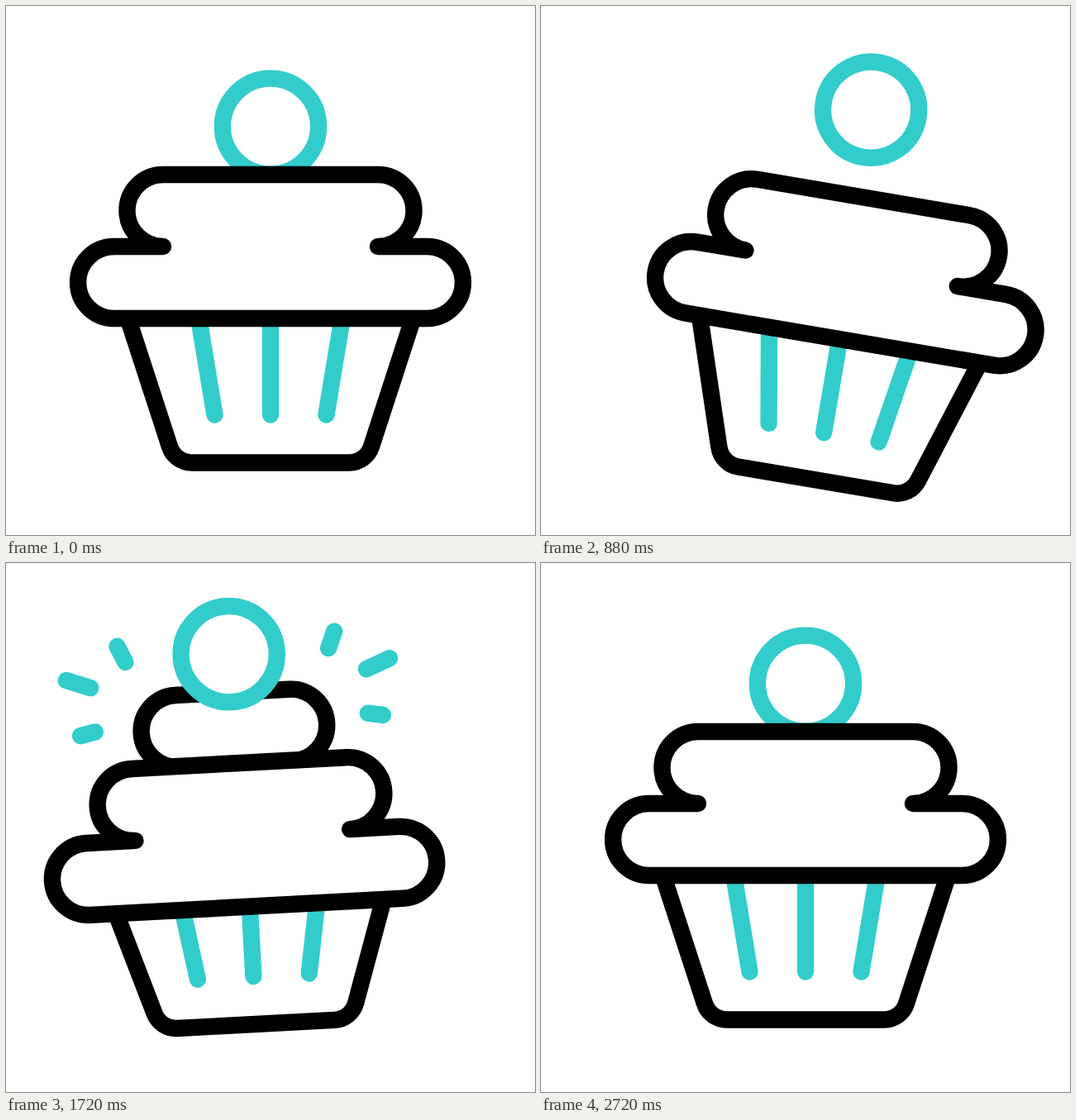
Write an HTML page that moves like this. It is 640 px wide and 640 px high and loops after 2800 ms.

```html
<!DOCTYPE html>
<html lang="en">
<head>
<meta charset="utf-8">
<title>Cupcake</title>
<style>
  html, body { margin: 0; width: 100%; height: 100%; overflow: hidden; background: #fff; }
  svg { display: block; width: 100vw; height: 100vh; }
  .ink, .teal { stroke-width: 20.4; stroke-linecap: round; stroke-linejoin: round; fill: #fff; }
  .ink { stroke: #000; }
  .teal { stroke: #3cc; }
</style>
</head>
<body>
<svg viewBox="0 0 640 640">
  <g id="cake">
    <g id="rays" class="teal" transform="translate(309 140) rotate(-.9)"></g>
    <path class="ink" d="M143.7 366L198 533A28 28 0 0 0 224.6 552.5H415.4A28 28 0 0 0 442 533L496.3 366"/>
    <path class="teal" d="M231.6 368L252.5 494.5M320 368V494.5M408.4 368L387.5 494.5"/>
    <rect id="tier" class="ink" x="207.6" y="214" width="224.8" height="87" rx="43.5"/>
    <circle id="cherry" class="teal" cx="320" cy="145.7" r="58.1"/>
    <path id="frosting" class="ink" d="M190 291H130.6A43.5 43.5 0 0 0 130.6 378H509.4A43.5 43.5 0 0 0 509.4 291H450A43.5 43.5 0 0 0 450 204H190A43.5 43.5 0 0 0 190 291Z"/>
  </g>
</svg>
<script>
const LOOP = 2800, STEP = 40;
const $ = id => document.getElementById(id);

const smooth = p => p * p * (3 - 2 * p);
const smoother = p => p * p * p * (p * (6 * p - 15) + 10);

// Eased progress from 0 to 1 between two times
const tween = (t, from, to, ease = smooth) =>
  ease(Math.min(1, Math.max(0, (t - from) / (to - from))));

function move(id, x, y, turn = 0) {
  $(id).setAttribute("transform", `translate(${x} ${y}) rotate(${turn} 320 320)`);
}

function add(parent, tag, transform) {
  const el = document.createElementNS("http://www.w3.org/2000/svg", tag);
  el.setAttribute("transform", transform);
  return parent.appendChild(el);
}

// The same three rays on both sides of the cherry
function makeRay(side, x, y, angle, length) {
  return { line: add(side, "line", `translate(${x} ${y}) rotate(${angle})`), length };
}

const rays = [1, -1].flatMap(flip => {
  const side = add($("rays"), "g", `scale(${flip} 1)`);
  return [
    makeRay(side, 125, -39.5, -66.7, 24),
    makeRay(side, 171.5, -8.5, -21, 34.7),
    makeRay(side, 170, 47.5, 11, 20.5)
  ];
});

// Tip to the right, sway over to the left, settle upright
function lean(t) {
  const sway = tween(t, 770, 1300, smoother);
  const settle = tween(t, 1300, 2120);
  const x = 59 * tween(t, 20, 620) - 121 * sway + 62 * settle;
  const y = 24.5 * tween(t, 80, 640) - 5.5 * sway - 19 * tween(t, 1320, 1950);
  const turn = 10.7 * tween(t, 40, 640) - 17 * sway + 6.3 * settle;
  move("cake", x, y, turn);
}

// The frosting sinks while a third tier rises out of it
function stack(t) {
  const sink = tween(t, 820, 1240) - tween(t, 2180, 2620);
  const rise = tween(t, 820, 1315) - tween(t, 2140, 2560);
  move("frosting", -4 * sink, 32 * sink);
  move("tier", -7.5 * sink, -64 * rise);
}

// Hop up, rest on the new tier, hop again and fall back
function hop(t) {
  const x = -9 * (tween(t, 570, 880) - tween(t, 2060, 2620));
  const y = -58 * tween(t, 570, 1010) + 16 * tween(t, 1030, 1500)
    - 18.5 * tween(t, 2220, 2460) + 60.5 * tween(t, 2460, 2700);
  move("cherry", x, y);
}

function shine(t) {
  const grow = tween(t, 1240, 1840) - tween(t, 2240, 2600);
  const from = 45 * (grow - 1);
  $("rays").style.display = grow > 0 ? "" : "none";
  for (const { line, length } of rays) {
    line.setAttribute("x1", from);
    line.setAttribute("x2", from + length * grow);
  }
}

const start = performance.now();
function frame() {
  const now = (performance.now() - start) % LOOP;
  const t = Math.floor(now / STEP) * STEP;
  for (const part of [lean, stack, hop, shine]) part(t);
  requestAnimationFrame(frame);
}
frame();
</script>
</body>
</html>
```
